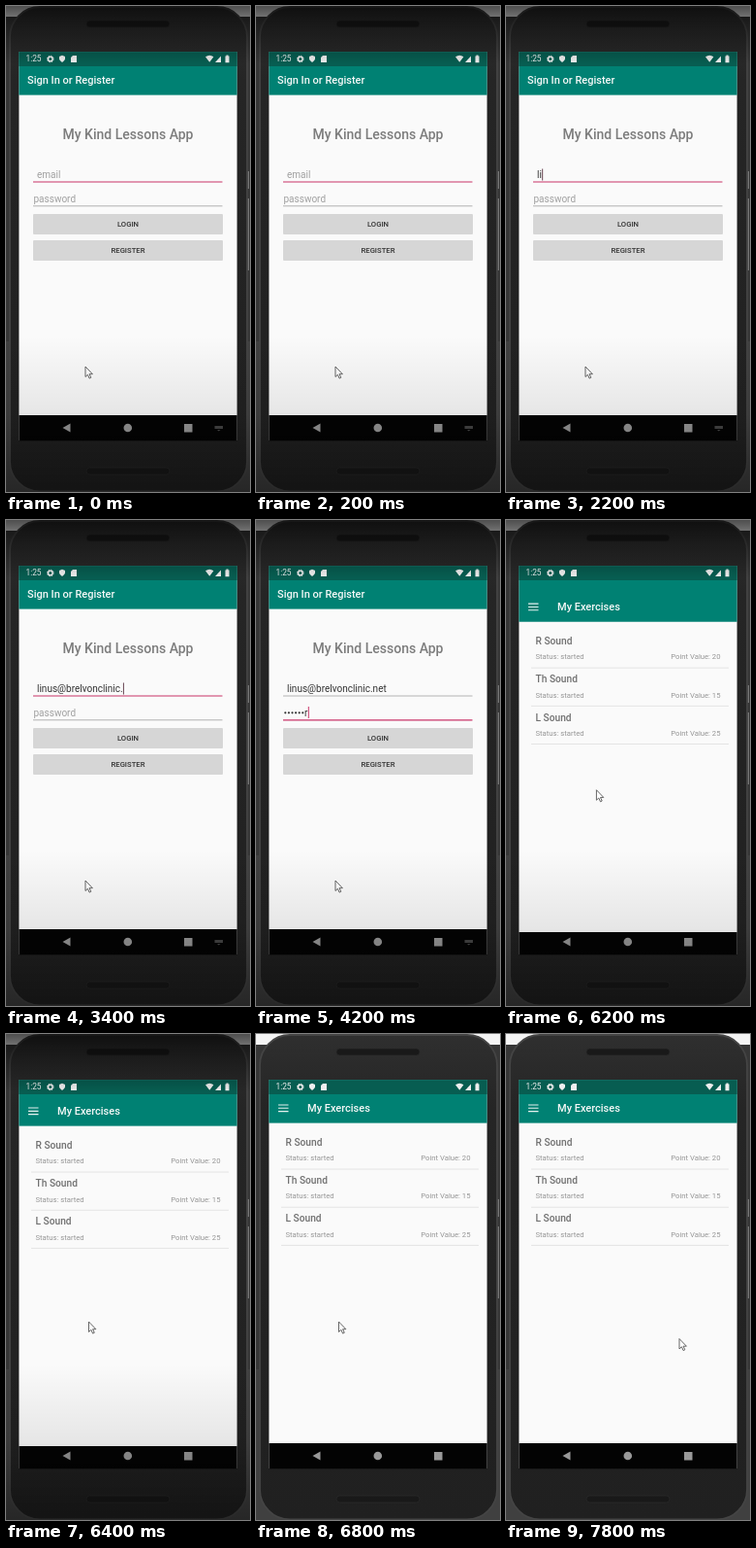
Write an HTML page that moves like this. It is 252 px wide and 500 px high and loops after 8000 ms.

```html
<!DOCTYPE html>
<html lang="en">
<head>
<meta charset="utf-8">
<style>
html, body { margin: 0; width: 100%; height: 100%; overflow: hidden; background: #363636; }
svg { display: block; width: 252px; height: 500px; font-family: Roboto, "Noto Sans", sans-serif; }
.bar { font-size: 11px; font-weight: 500; fill: #f4f8f7; }
.field { font-size: 10px; }
.button { font-size: 7.7px; font-weight: 500; fill: #333; text-anchor: middle; }
.item { font-size: 10.2px; font-weight: 500; fill: #707070; }
.detail { font-size: 7.7px; fill: #969696; }
</style>
</head>
<body>
<svg viewBox="0 0 252 500">
  <defs>
    <clipPath id="screen"><rect x="13.4" y="47.2" width="225.2" height="400"/></clipPath>
    <linearGradient id="body" x2="0" y2="1">
      <stop offset="0" stop-color="#2f2f2f"/><stop offset=".15" stop-color="#252525"/>
      <stop offset="1" stop-color="#202020"/>
    </linearGradient>
    <linearGradient id="topShade" x2="0" y2="1">
      <stop offset="0" stop-opacity=".68"/><stop offset=".3" stop-opacity=".45"/>
      <stop offset="1" stop-opacity="0"/>
    </linearGradient>
    <linearGradient id="bottomShade" x2="0" y2="1">
      <stop offset="0" stop-opacity="0"/><stop offset=".5" stop-opacity=".08"/>
      <stop offset="1" stop-opacity=".4"/>
    </linearGradient>
  </defs>

  <rect width="252" height="500" fill="#363636"/>
  <rect width="252" height="11" fill="#f4f4f4"/>
  <rect y="345" width="252" height="155" fill="#404040"/>
  <path d="M248 170h3v18h-3zM248 198h3v74h-3z" fill="#777"/>
  <rect x="4" y="1" width="245" height="498.500" rx="31" fill="url(#body)" stroke="#444" stroke-width="1.800"/>
  <g fill="#191919" stroke="#2b2b2b" stroke-width=".7">
    <rect x="83" y="15" width="86" height="7" rx="3.500"/>
    <rect x="83" y="475" width="86" height="7" rx="3.500"/>
  </g>

  <g clip-path="url(#screen)">
    <rect x="13" y="47" width="226" height="400" fill="#fafafa"/>
    <g id="login">
      <rect x="13" y="47" width="226" height="44.600" fill="#008173"/>
      <text class="bar" x="22" y="80">Sign In or Register</text>
      <text x="126" y="137" text-anchor="middle" font-size="14" font-weight="500" fill="#7c7c7c">My Kind Lessons App</text>
      <text id="email" class="field" x="32" y="177"></text>
      <text id="password" class="field" x="28.500" y="202"></text>
      <g id="dots" fill="#333"></g>
      <path id="emailLine" d="M28 181H223.500"/>
      <path id="passwordLine" d="M28 205.800H223.500"/>
      <rect id="caret" width="1" height="12"/>
      <rect id="loginButton" x="28" y="214" width="196" height="21" rx="1"/>
      <rect x="28" y="241" width="196" height="21" rx="1" fill="#d6d6d6"/>
      <text class="button" x="126" y="227.200">LOGIN</text>
      <text class="button" x="126" y="254.200">REGISTER</text>
    </g>
    <g id="exercises">
      <rect x="13" y="30" width="226" height="61.600" fill="#008173"/>
      <path d="M23 73h10.500M23 76.300h10.500M23 79.600h10.500" stroke="#e4f0ee" stroke-width="1.100"/>
      <text class="bar" x="53" y="80">My Exercises</text>
      <g id="list"></g>
    </g>

    <rect x="13" y="47" width="226" height="15" fill="#075d51"/>
    <g fill="#eee">
      <text x="20.500" y="57.400" font-size="8.300">1:25</text>
      <circle cx="45.800" cy="54.500" r="2.300" fill="none" stroke="#eee" stroke-width="1.500"/>
      <circle cx="45.800" cy="54.500" r="3.300" fill="none" stroke="#eee" stroke-width="1" stroke-dasharray="1.300 1.292"/>
      <path d="M55 52l3-1.300 3 1.300v2.300q-.3 2.500-3 3.700-2.700-1.200-3-3.700z"/>
      <path d="M67 53l2-2h4v7h-6z"/>
      <path d="M206 52.300q4.200-3 8.400 0l-4.200 5.500z"/>
      <path d="M216 58h6v-6.500z"/>
      <path d="M226.500 51.500h1v-1h2v1h1v6.800h-4z"/>
    </g>

    <rect id="nav" x="13" y="421" width="226" height="30" fill="#030303"/>
    <g fill="#999">
      <path d="M58.500 434l8-4.500v9z"/>
      <circle cx="125.800" cy="434" r="4.300"/>
      <rect x="184" y="430" width="8.500" height="8.500"/>
      <path id="keyboardIcon" d="M215.500 432h8.500v3h-8.500zM218 436h3.500l-1.750 1.500z" fill="#444"/>
    </g>
  </g>

  <path id="pointer" d="M0 0v10.500l2.400-2.200 1.700 3.800 1.700-.8-1.700-3.600h3.300z" fill="#fff" stroke="#555" stroke-width=".9"/>

  <g id="shade">
    <rect width="252" height="60" fill="url(#topShade)"/>
    <rect y="340" width="252" height="160" fill="url(#bottomShade)"/>
  </g>
</svg>
<script>
const LOOP = 8000, STEP = 200;
const ACCENT = "#c93468";
const EMAIL = "linus@brelvonclinic.net";
const SECRET = "wanderrose";
const DOT_GAP = 3.6;

const emailKeys = [[2000, 0], [2200, 2], [3200, 15], [3400, 20], [3600, 23]];
const secretKeys = [[3800, 0], [4200, 7], [4400, 10]];
const pointerX = [[4400, 82], [5200, 116], [5800, 116], [6400, 85.5], [6900, 85.5], [7700, 179]];
const pointerY = [[4400, 371], [5200, 225.5], [5800, 225.5], [6400, 296], [6900, 296], [7700, 313.5]];

const el = {};
document.querySelectorAll("[id]").forEach(node => el[node.id] = node);
const set = (node, attrs) => Object.entries(attrs).forEach(([k, v]) => node.setAttribute(k, v));
const show = (node, on) => set(node, { visibility: on ? "visible" : "hidden" });
const smooth = p => p * p * (3 - 2 * p);

function at(keys, t, ease = p => p) {
  if (t <= keys[0][0]) return keys[0][1];
  for (let i = 1; i < keys.length; i++) {
    const [t0, a] = keys[i - 1], [t1, b] = keys[i];
    if (t <= t1) return a + (b - a) * ease((t - t0) / (t1 - t0));
  }
  return keys[keys.length - 1][1];
}

el.list.innerHTML = [["R", 20], ["Th", 15], ["L", 25]].map(([sound, points], i) => `
  <g transform="translate(0 ${i * 39.2})">
    <text class="item" x="30.5" y="115">${sound} Sound</text>
    <text class="detail" x="30.5" y="130.3">Status: started</text>
    <text class="detail" x="221.5" y="130.3" text-anchor="end">Point Value: ${points}</text>
    <path d="M26 139H230" stroke="#e4e4e4"/>
  </g>`).join("");

el.dots.innerHTML = [...SECRET].map((_, i) =>
  `<circle cx="${30.3 + i * DOT_GAP}" cy="198.3" r="1.1"/>`).join("");

function fillField(node, text, hint) {
  node.textContent = text || hint;
  node.style.fill = text ? "#333" : "#a0a0a0";
}

function drawForm(t) {
  const typed = Math.floor(at(emailKeys, t));
  fillField(el.email, EMAIL.slice(0, typed), "email");

  const count = Math.floor(at(secretKeys, t));
  const plain = count > 0 && t < 5000;
  const hidden = plain ? count - 1 : count;
  fillField(el.password, plain ? SECRET[count - 1] : "", count ? "" : "password");
  set(el.password, { x: 28.5 + hidden * DOT_GAP });
  [...el.dots.children].forEach((dot, i) => show(dot, i < hidden));

  const onPassword = t >= 3800;
  const line = on => ({ stroke: on ? ACCENT : "#aaa", "stroke-width": on ? 1.2 : 0.9 });
  set(el.emailLine, line(!onPassword));
  set(el.passwordLine, line(onPassword));

  const field = onPassword ? el.password : el.email;
  const empty = onPassword && !plain;
  set(el.caret, {
    x: +field.getAttribute("x") + (empty ? 0 : field.getComputedTextLength()) + .3,
    y: onPassword ? 192 : 167.5,
    fill: onPassword ? ACCENT : "#684653"
  });
  show(el.caret, t >= 2200 && t < 5000);
  set(el.loginButton, { fill: t >= 5600 ? "#c4c4c4" : "#d6d6d6" });
}

function draw(t) {
  const opened = t >= 6200;
  el.login.style.display = opened ? "none" : "";
  el.exercises.style.display = opened ? "" : "none";
  if (!opened) drawForm(t);

  // The new screen slides up into place.
  const progress = Math.min(1, Math.max(0, (t - 6160) / 425));
  const lift = opened ? 16 * (1 - progress) ** 2 : 0;
  set(el.exercises, { transform: `translate(0 ${lift})` });
  set(el.nav, { transform: `translate(0 ${Math.min(lift, 3)})` });
  show(el.keyboardIcon, !opened);

  show(el.shade, t < 6600);
  set(el.pointer, { transform: `translate(${at(pointerX, t, smooth)} ${at(pointerY, t, smooth)})` });
}

const start = performance.now();
function frame() {
  const t = (performance.now() - start) % LOOP;
  draw(Math.floor(t / STEP) * STEP);
  requestAnimationFrame(frame);
}
frame();
</script>
</body>
</html>
```
